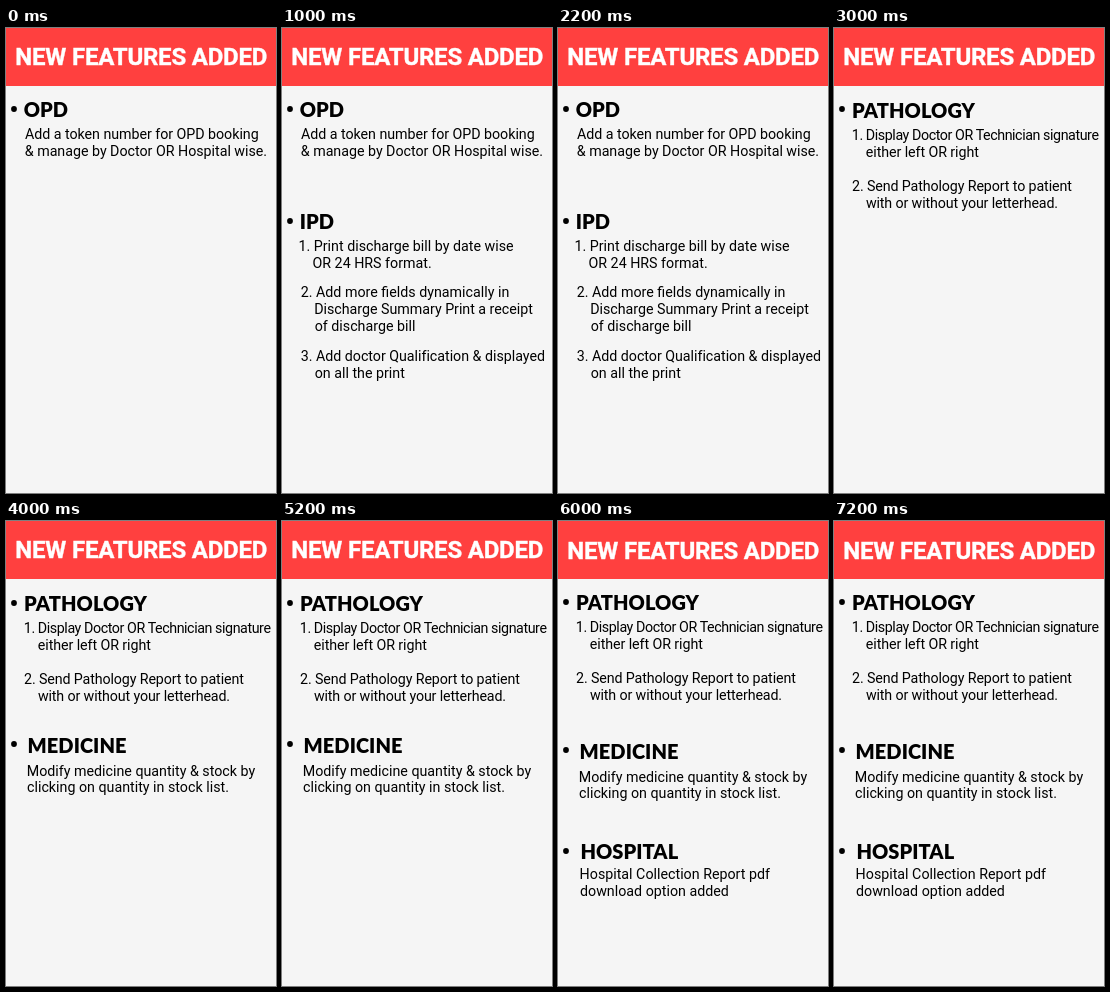
Recreate the animation shown at these times as an HTML page. Size 270 by 465 pixels, loop 8 s.

```html
<!DOCTYPE html>
<html lang="en">
<head>
<meta charset="utf-8">
<title>New features added</title>
<style>
  html, body { margin: 0; width: 100%; height: 100%; overflow: hidden; background: #f5f5f5; }
  svg { display: block; width: 100%; height: 100%; }
  text { font: 14.25px Roboto, sans-serif; white-space: pre; }
  .title { font-size: 24px; font-weight: 700; letter-spacing: -0.2px; fill: #fff; stroke: #fff; stroke-width: 0.4px; }
  .head { font: 900 20px Lato, sans-serif; letter-spacing: 0.06px; }
</style>
</head>
<body>
<svg viewBox="0 0 270 465">
  <rect width="270" height="465" fill="#f5f5f5"/>
  <rect width="270" height="58" fill="#ff403f"/>
  <text id="title" class="title" x="9.3" y="37">NEW FEATURES ADDED</text>
  <g id="list"></g>
</svg>
<script>
const LOOP = 8000;
const title = document.getElementById('title');
const list = document.getElementById('list');

const text = (x, y, str, spacing = 0) =>
  `<text x="${x}" y="${y}" letter-spacing="${spacing}">${str.replace('&', '&amp;')}</text>`;

const heading = (x, y, str, dotY) =>
  `<circle cx="8" cy="${dotY}" r="2.9"/><text class="head" x="${x}" y="${y}">${str}</text>`;

const opd = heading(17.7, 89, 'OPD', 81) +
  text(19, 111, 'Add a token number for OPD booking', -0.04) +
  text(18.8, 128, '& manage by Doctor OR Hospital wise.', -0.02);

const ipd = heading(17.7, 201, 'IPD', 193) +
  text(16.5, 223, '1. Print discharge bill by date wise') +
  text(30.5, 240, 'OR 24 HRS format.') +
  text(18.7, 269, '2. Add more fields dynamically in') +
  text(32.2, 286, 'Discharge Summary Print a receipt', -0.02) +
  text(32.7, 303, 'of discharge bill') +
  text(18.7, 333, '3. Add doctor Qualification & displayed', -0.02) +
  text(32.7, 350, 'on all the print');

const pathology = (y, dotY) => heading(18.1, y, 'PATHOLOGY', dotY) +
  text(17.8, y + 22, '1. Display Doctor OR Technician signature', -0.42) +
  text(31.8, y + 39, 'either left OR right', -0.08) +
  text(18, y + 73, '2. Send Pathology Report to patient', -0.12) +
  text(31.9, y + 90, 'with or without your letterhead.', -0.13);

const medicine = (y, dotY) => heading(21.6, y, 'MEDICINE', dotY) +
  text(20.8, y + 23, 'Modify medicine quantity & stock by', -0.01) +
  text(21, y + 39, 'clicking on quantity in stock list.');

const hospital = heading(22.4, 338, 'HOSPITAL', 330) +
  text(21.6, 358, 'Hospital Collection Report pdf') +
  text(22, 375, 'download option added');

const pages = [
  { start: 0, titleY: 37, body: opd },
  { start: 1000, titleY: 37, body: opd + ipd },
  { start: 3000, titleY: 37, body: pathology(90, 81) },
  { start: 4000, titleY: 37, body: pathology(90, 82) + medicine(232, 223) },
  { start: 6000, titleY: 38, body: pathology(89, 81) + medicine(238, 229) + hospital },
];

let shown;
function draw(now) {
  const time = now % LOOP;
  const page = pages.findLast(p => p.start <= time);
  if (page !== shown) {
    shown = page;
    title.setAttribute('y', page.titleY);
    list.innerHTML = page.body;
  }
}

const origin = performance.now();
function tick() {
  draw(performance.now() - origin);
  requestAnimationFrame(tick);
}
tick();
</script>
</body>
</html>
```
